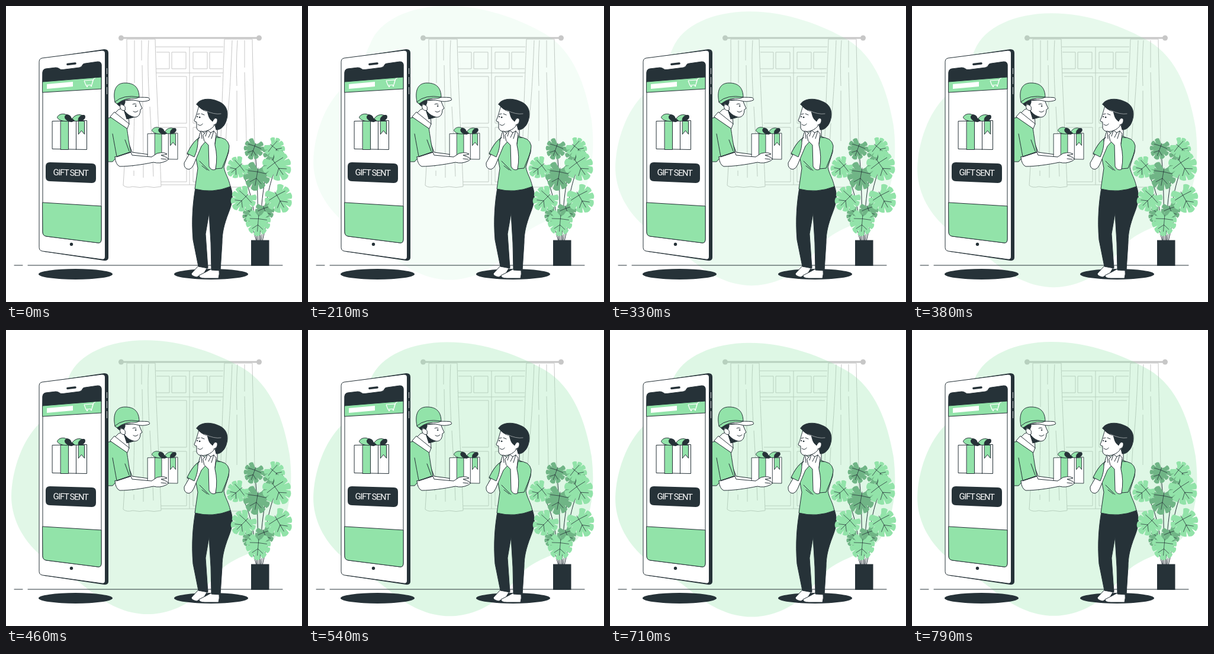
Recreate the animation shown at these times as an HTML page. Size 500x500 px, loop 0.83 s.

```html
<!DOCTYPE html>
<html lang="en">
<head>
<meta charset="utf-8">
<title>Gift sent</title>
<style>
  html, body { margin: 0; width: 100%; height: 100%; overflow: hidden; background: #fff; }
  svg { display: block; width: 100%; height: 100%; }
  .ink { stroke: #263238; stroke-width: 1; stroke-linecap: round; stroke-linejoin: round; }
  .line { fill: none; }
  .white { fill: #fff; }
  .green { fill: #92e3a9; }
  .dark { fill: #263238; }
  .window { fill: none; stroke: #c7c7c7; stroke-width: 1; }
  .label { font: 400 14.5px Roboto, "Open Sans", sans-serif; letter-spacing: -1.2px; fill: #fff; text-anchor: middle; }
</style>
</head>
<body>
<svg viewBox="0 0 500 500">
  <defs>
    <g id="gift" class="ink">
      <path class="white" d="M0 12L58 11V60L0 59Z"/>
      <path class="green" d="M14 12H27V60H14Z"/>
      <path class="line" d="M40 12V60"/>
      <path class="green" d="M44 12H54V34L49 28L44 34Z"/>
      <path class="green" d="M28 12C19 13 11 11 8 6C9 1 17-2 23 1C29 4 30 9 28 12Z"/>
      <path class="dark" d="M28 12C20 10 19 3 24 1C32 2 34 8 28 12Z"/>
      <path class="green" d="M32 11C34 4 42-1 50 2C53 2 54 3 54 6C52 12 42 13 32 11Z"/>
      <path class="dark" d="M44 12C42 7 47 1 54 2C57 6 53 12 44 12Z"/>
      <path class="dark" d="M27 12L32 7L37 11L33 13Z"/>
    </g>
  </defs>

  <g class="window">
    <path d="M253 69H367M254 78H276V106H254M280 78H304V106H280ZM316 78H340V106H316ZM366 78H344V106H366M253 113H367M310 69V302M257 119H305V198H260M260 205H305V297H262M363 119H316V198H361M361 205H316V297H360M262 302H370"/>
    <path fill="#fff" d="M204 56C205 130 203 230 198 303Q204 308 214 305Q226 308 238 305Q250 308 262 305C260 240 254 150 252 56Z"/>
    <path d="M217 58V130M217 138C217 190 216 240 214 272M216 278V287M229 58V92M230 100C231 160 232 230 232 290M241 58C239 90 240 120 242 160M243 170C245 210 248 250 249 288"/>
    <path fill="#fff" d="M369 56C367 110 364 190 360 306H420C421 210 417 130 416 56Z"/>
    <path d="M382 58C380 110 378 150 374 190M373 198L369 270M391 58C389 85 389 110 390 135M390 143V228M403 58V104M403 112C404 160 406 200 406 238"/>
    <path stroke-width="3" d="M195 54H427"/>
    <g fill="#c7c7c7" stroke="none"><circle cx="194.500" cy="54" r="4.500"/><circle cx="427.500" cy="54" r="4.500"/></g>
  </g>

  <path id="blob" class="green" opacity="0" d="M235 20C300 20 360 44 400 67C449 96 469 155 479 213C485 263 480 308 462 343C445 373 405 378 375 398C345 418 330 468 260 481C215 489 175 470 140 442C110 416 85 406 57 382C25 354 9 318 9 283C10 238 28 188 57 160C85 136 92 113 106 82C122 43 175 20 235 20Z"/>

  <path class="ink" d="M14 438H28M37 438H467"/>
  <ellipse class="dark" cx="117.500" cy="453" rx="62.500" ry="9"/>
  <ellipse class="dark" cx="346.500" cy="453" rx="62.500" ry="9"/>

  <g id="courier" class="ink">
    <path class="white" d="M207 231L213 247L242 251L239 260L205 255Z"/>
    <path class="green" d="M168 190L180 188L204 205C206 219 208 234 211 246L188 254L180 263H168Z"/>
    <path class="line" d="M180 216Q184 238 187 254M201 226L208 245"/>
    <path class="white" d="M190 175L184 181L204 203L208 200L207 184L201 172Z"/>
    <path class="dark" d="M199 175L204 191L219 187Z"/>
    <path class="white" d="M197 160L224 158L226 164L230 173L227 175Q227 187 218 188Q207 186 201 178Z"/>
    <path class="dark" d="M185 159L201 158L201 163L198 171L194 164L192 169Q187 167 185 159Z"/>
    <path class="white" d="M201 170C195 163 190 168 194 174Q197 178 201 176Z"/>
    <path class="line" d="M215 178Q219 181 223 177M214 166Q217 164 220 166"/>
    <circle class="dark" cx="219" cy="169" r=".8"/>
    <path class="white" d="M176 187L183 179L208 199L205 207Z"/>
    <path class="green" d="M184 162C180 142 186 130 201 130C217 130 225 138 225 155C212 153 199 155 188 165Z"/>
    <path class="white" d="M194 162C205 153 225 154 239 154.500Q244 156 242 159Q236 162 225 161C210 157 204 158 196 161Z"/>
    <path class="green" d="M184 162Q198 149 225 154L220 156Q202 154 188 165Z"/>
    <use href="#gift" transform="translate(239.500 205) scale(.87 .9)"/>
    <path class="white" d="M184 255L211 247L213 252L246 255L255 249Q262 247 267 248L272 250Q268 252 262 252L272 256Q276 260 270 262Q260 267 249 264C230 268 208 271 192 271Q185 268 184 255Z"/>
    <path class="line" d="M262 258L271 259M211 247L187 255"/>
  </g>

  <g id="phone">
    <path class="dark" d="M64 88L166 73Q173 73 173 79V425Q173 431 165 430L64 415Z"/>
    <path class="ink white" d="M56 94Q56 89 61 88L162 75Q167.500 75 167.500 80V423Q167.500 429 162 428L61 414Q56 413 56 408Z"/>
    <path stroke="#fff" stroke-width=".8" d="M170.500 105V115M170.500 120V132M170.500 137V149"/>
    <path stroke="#263238" stroke-width="3.600" stroke-linecap="round" d="M104 98.500L117 97"/>
    <path class="ink line" d="M62 112V382Q62 388 68 389L155 400Q161 401 161 394V99"/>
    <path class="ink dark" d="M62 112Q62 107 67 106L84 104Q88 104 90 106Q92 108 96 107.500L124 104Q128 103 129 100Q130 97 134 97L155 94Q161 94 161 99V121L62 129Z"/>
    <path class="ink green" d="M62 128L161 120V140L62 146Z"/>
    <path class="white" d="M69 132L113 128V136L69 140Z"/>
    <path class="line" stroke="#fff" stroke-width="1.200" d="M132 126L147 125L145 133L135 134L132 126M151 122L148 123L145 133"/>
    <circle class="white" cx="137" cy="136" r="1.300"/><circle class="white" cx="144" cy="135" r="1.300"/>
    <use href="#gift" x="78.500" y="182.500"/>
    <path class="dark" d="M67 271Q67 264 74 264L145 266Q152 266 152 273V292Q152 299 145 299L74 296Q67 296 67 289Z"/>
    <text class="label" transform="translate(109 286.500) rotate(1.300)">GIFT SENT</text>
    <path class="ink green" d="M62 332L161 338V394Q161 401 155 400L68 389Q62 388 62 382Z"/>
    <circle class="dark" cx="110.500" cy="402.500" r="2.700"/>
  </g>

  <g id="receiver" class="ink">
    <path class="white" d="M325 439L313 452Q313 456 322 458L334 452L341 440Z"/>
    <path class="white" d="M347 444L338 449L326 455Q326 460 336 460H359Q361 453 360 445Z"/>
    <path class="dark" d="M320 307L379 304C385 320 382 334 376 349C368 370 365 383 365 400L362 447L347 446L346 400L343 350L337 385L341 443L325 440L316 395C313 360 316 330 320 307Z"/>
    <path class="white" d="M338 197L340 222L357 222V196Z"/>
    <path class="green" d="M327 222C317 228 311 239 306 250L321 258L324 274L319 309Q349 317 379 305C376 290 370 284 368 272L376 247Q379 232 368 225L354 219Z"/>
    <path class="line" d="M327 262L343 278M331 270L340 277M365 250L360 270"/>
    <path class="white" d="M327 166C323 177 322 185 318 193Q318 196 322 196L322 206Q324 213 334 212Q344 211 351 203L357 188L345 165Z"/>
    <path class="dark" d="M322 166C327 156 345 155 358 161C372 166 377 178 372 194C369 204 361 210 355 209L353 201L357 193Q352 187 349 195C342 190 342 184 340 178C333 177 327 172 322 166Z"/>
    <path class="white" d="M350 193Q353 187 357 191Q358 199 351 201"/>
    <path class="line" d="M324 200Q329 204 332 199M323 183L327 182M330 182L335 184"/>
    <circle class="dark" cx="327" cy="188" r=".9"/><circle class="dark" cx="323" cy="187" r=".6"/>
    <path class="line" d="M335 176Q352 184 363 182" style="stroke:#fff;stroke-width:.5"/>
    <path class="white" d="M312 246L301 265Q300 275 309 276Q314 275 317 268L330 237L337 229L335 214L329 211L326 221L323 232Z"/>
    <path class="green" d="M327 222C317 228 311 239 306 249L318 255Q325 240 324 226Z"/>
    <path class="white" d="M333 218L340 210L346 214L351 211L355 216L353 232L358 259L354 276Q347 279 343 271L342 235L335 228Z"/>
    <path class="line" d="M340 211L337 220M346 214L342 222M351 211L347 224M330 213L331 224"/>
    <path class="green" d="M355 222Q374 221 377 236C377 248 369 263 365 274L354 275Q358 255 353 235Z"/>
  </g>

  <g id="plant">
    <path class="ink line" stroke-width=".8" d="M426 397C425 340 426 290 420 240M429 397C430 340 434 290 452 240M424 397C420 340 412 300 392 272M431 397C437 350 442 300 458 270M423 397L404 328M433 397Q442 350 461 326M429 397V350"/>
    <g id="leaves"></g>
    <rect class="dark" x="414" y="395.500" width="30.500" height="43.500"/>
  </g>
</svg>
<script>
  const leaves = document.getElementById("leaves");
  const blob = document.getElementById("blob");

  // Split leaf: a heart shape with a pointed tip and narrow slits towards the midrib.
  function addLeaf(x, y, size, turn, fill) {
    const lobes = 9, start = -2.75, step = 5.5 / lobes;
    const at = (angle, r) => {
      const reach = r * size * (1 + .18 * Math.max(0, Math.cos(angle)) ** 6);
      return `${(Math.sin(angle) * reach).toFixed(1)} ${(Math.cos(angle) * reach).toFixed(1)}`;
    };
    let outline = `M0 ${-size * .4}`, veins = `M0 ${-size * .5}L0 ${size * .8}`;
    for (let i = 0; i < lobes; i++) {
      const a = start + i * step, middle = a + step / 2;
      outline += `L${at(a + .06, .97)}Q${at(middle, 1.1)} ${at(a + step - .06, .97)}L${at(a + step, .62)}`;
      if (i % 2) veins += `M0 ${size * (.45 * Math.cos(middle) - .1)}L${at(middle, .7)}`;
    }
    leaves.insertAdjacentHTML("beforeend",
      `<g transform="translate(${x} ${y}) rotate(${turn})"><path d="${outline}Z" fill="${fill}"/>` +
      `<path class="ink line" style="stroke-width:.7" d="${veins}"/></g>`);
  }

  const light = "#92e3a9", shade = "#70b586";
  [
    [451, 247, 17, -35, shade], [419, 240, 17, 20, shade], [453, 239, 17, -50, light],
    [424, 285, 23, 10, shade], [392, 272, 18, 50, light], [457, 269, 24, -35, light],
    [437, 345, 16, -20, shade], [413, 352, 13, 40, shade], [402, 325, 21, 45, light],
    [460, 324, 23, -30, light], [426, 364, 21, 5, light]
  ].forEach(leaf => addLeaf(...leaf));

  // Easing cubic-bezier(.36, -.01, .5, 1.38), solved by bisection.
  const bezier = (s, p1, p2) => 3 * (1 - s) ** 2 * s * p1 + 3 * (1 - s) * s * s * p2 + s ** 3;
  function ease(x) {
    let low = 0, high = 1;
    for (let i = 0; i < 24; i++) {
      const mid = (low + high) / 2;
      if (bezier(mid, .36, .5) < x) low = mid; else high = mid;
    }
    return bezier(low, -.01, 1.38);
  }

  const LOOP = 830, STEPS = 20, HELD = [1, 6, 16];

  function draw(now) {
    let step = Math.min(STEPS - 1, Math.floor((now % LOOP + 5) * .024));
    if (HELD.includes(step)) step--;
    const progress = ease((step + 1) / STEPS);
    blob.setAttribute("transform", `translate(0 ${30 * (progress - 1)})`);
    blob.setAttribute("opacity", step ? .3 * Math.min(1, Math.max(0, progress)) : 0);
    requestAnimationFrame(() => draw(performance.now() - begin));
  }
  const begin = performance.now();
  draw(0);
</script>
</body>
</html>
```
